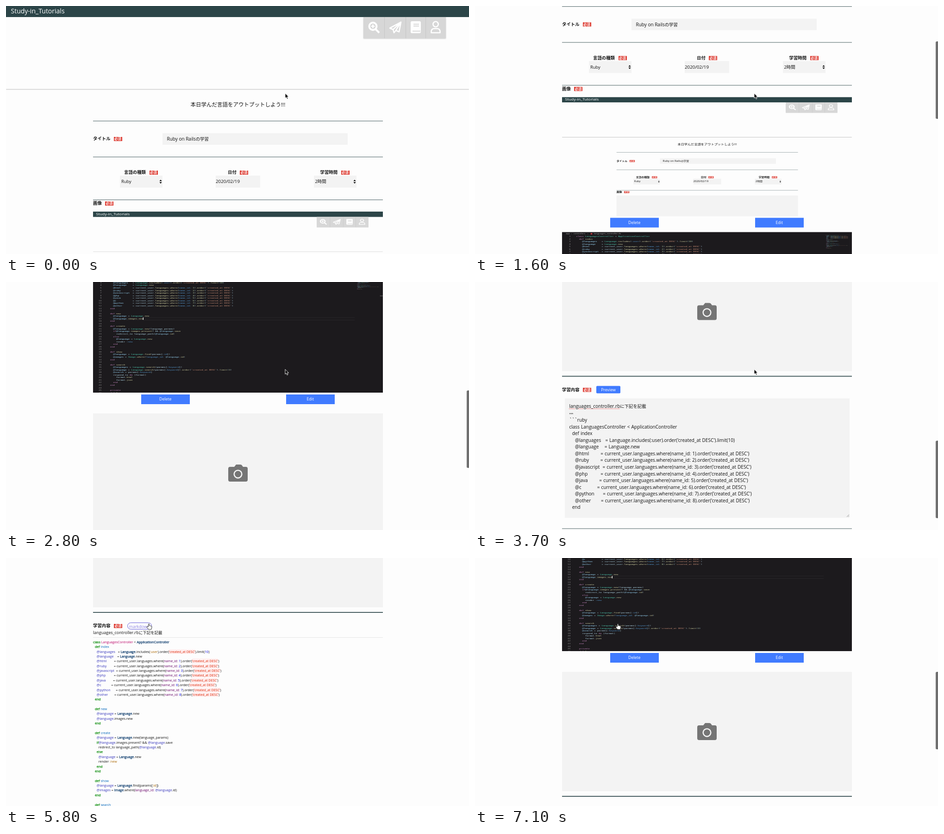
Recreate the animation shown at these times as an HTML page. Size 1000 by 538 pixels, loop 7.2 s.

```html
<!DOCTYPE html>
<html lang="ja">
<head>
<meta charset="utf-8">
<title>Study form</title>
<style>
html, body { margin: 0; width: 100%; height: 100%; overflow: hidden; background: #fdfdfd; }
body { position: relative; color: #111; font-family: "Open Sans", "Noto Sans CJK JP", sans-serif; }
div { position: absolute; white-space: pre; line-height: 20px; }
svg { position: absolute; overflow: visible; }
.jp { font-size: 94%; }
.badge { background: #dc352b; color: #fff; font-weight: 700; font-size: 7.5px; line-height: 9px; text-align: center; }
.btn { background: #407bff; color: #fff; font-size: 8.8px; text-align: center; }
.box { background: #f3f3f3; }
.scaled { transform: scale(.626, .4814); transform-origin: 0 0; overflow: hidden; }
.misspelt { text-decoration: underline dotted #e33 1.2px; text-underline-offset: 2px; }
.area { font-size: 10px; line-height: 14.53px; word-spacing: .5px; }
.area div { line-height: inherit; }
.light { font-size: 7.1px; line-height: 10.38px; word-spacing: .12px; }
.light .k { color: #080; } .light .t { color: #b06; } .light .c { color: #036; }
.light .f { color: #06b; } .light .i { color: #33b; } .light .y { color: #a60; }
.light .e { color: #606; } .light .n { color: #00d; }
.light .s { color: #d20; background: #fff0f0; }
.light :is(.k, .c) { -webkit-text-stroke: .25px; }
.dark { font: 8.6px/11.54px "DejaVu Sans Mono", monospace; color: #b5dcec; }
.dark .k { color: #c586c0; } .dark :is(.t, .c) { color: #4ec9b0; } .dark :is(.f, .m) { color: #dcdcaa; }
.dark .i { color: #9cdcfe; } .dark :is(.y, .e) { color: #569cd6; }
.dark .n { color: #b5cea8; } .dark .s { color: #ce9178; }
</style>
</head>
<body>
<script>
const fields = "html ruby javascript php java c python other".split(" ");
const assign = (name, value) => "    " + ("@" + name).padEnd(13) + "= " + value;
const ruby = [
  "class LanguagesController < ApplicationController",
  "  def index",
  assign("languages", "Language.includes(:user).order('created_at DESC').limit(10)"),
  assign("language", "Language.new"),
  ...fields.map((f, i) => assign(f, `current_user.languages.where(name_id: ${i + 1}).order('created_at DESC')`)),
  `  end

  def new
    @language = Language.new
    @language.images.new
  end

  def create
    @language = Language.new(language_params)
    if@language.images.present? && @language.save
      redirect_to language_path(@language.id)
    else
      @language = Language.new
      render :new
    end
  end

  def show
    @language = Language.find(params[:id])
    @images = Image.where(language_id: @language.id)
  end

  def search
    @languages = Language.search(params[:keyword])
    @language = Language.search(params[:keyword]).order('created_at DESC').limit(3)
    @search = params[:keyword]
    respond_to do |format|
      format.html
      format.json
    end
  end

  private
  def language_params`
].join("\n");

const escape = s => s.replace(/&/g, "&amp;").replace(/</g, "&lt;");
const token = /(?<s>'[^']*')|(?<i>@\w+)|(?<t>(?<=class )\w+)|(?<f>(?<=def )\w+)|\b(?<k>class|def|end|if|else|do|private)\b|(?<y>:\w+)|(?<e>\w+:)|\b(?<c>[A-Z]\w+)|\b(?<n>\d+)\b|(?<m>\.\w+)/g;
const colored = escape(ruby).replace(token, (word, ...rest) => {
  const groups = rest.at(-1);
  return `<span class="${Object.keys(groups).find(k => groups[k])}">${word}</span>`;
});

const box = (x, y, w, h, css = "", html = "", cls = "") =>
  `<div class="${cls}" style="left:${x}px;top:${y}px;width:${w}px;height:${h}px;${css}">${html}</div>`;
const text = (x, y, s, size = 10, css = "") =>
  `<div style="left:${x}px;top:${y - 10}px;font-size:${size}px;${css}">${s}</div>`;
const block = (x, y, cls, s, css = "") =>
  `<div class="${cls}" style="left:${x}px;top:${y}px;${css}">${s}</div>`;
const svg = (x, y, html) => `<svg width="1" height="1" style="left:${x}px;top:${y}px">${html}</svg>`;
const rule = (y, h = 1) => box(188, y, 626, h, "background:#4a6063");
const label = (x, y, s, badgeX) =>
  text(x, y, s, 9.4, "font-weight:700") + box(badgeX, y - 3.7, 18, 9, "", "必須", "badge");
const button = (x, y, s, w = 104.5, h = 21, css = "") =>
  box(x, y, w, h, `line-height:${h}px;${css}`, s, "btn");
const buttons = y => button(292, y, "Delete") + button(605, y, "Edit");
const select = (x, s) => box(x, 368, 92, 26, "", "", "box") + text(x + 3, 381, s, 9.4) +
  svg(x + 88, 381, `<path d="M-2.6-1 0-4.2 2.6-1zM-2.6 1 0 4.2 2.6 1z"/>`);

const icons = `<rect width="178" height="46" fill="#d7d7d7" style="filter:drop-shadow(0 1px 1px #ccc)"/>
<path d="M45.5 0v46M91.5 0v46M134.500 0v46" stroke="#c6c6c6"/>
<g fill="none" stroke="#fff" stroke-width="2.6" stroke-linejoin="round">
<g stroke-width="4"><circle cx="20.500" cy="20" r="8"/><path d="M26 26l8 8"/></g>
<path d="M20.500 16v8M16.500 20h8"/>
<path d="M81 11 57 24l7 3 2 7 4-5 7 3zM64 27 81 11 70 29"/>
<circle cx="156" cy="15.500" r="5.700"/><path d="M146.500 34v-3a6 6 0 0 1 6-6h7a6 6 0 0 1 6 6v3z"/></g>
<rect x="102" y="9" width="22" height="26" rx="3" fill="#fff"/>
<path d="M108 15.500h12M108 19.500h12M106 30.500h17" stroke="#d7d7d7" stroke-width="2"/>`;

const form = box(0, 0, 1000, 180, "background:#fdfdfd;box-shadow:0 1px 2px #bbb") +
  box(0, 0, 1000, 24, "background:#2c4548") +
  text(10.5, 10.5, "Study-in_Tutorials", 14, "color:#fff") + svg(772, 24, icons) +
  text(398.5, 213.5, "本日学んだ言語をアウトプットしよう!!!", 11.5) +
  rule(248.5) + label(188, 287.5, "タイトル", 232.5) +
  box(338, 275.5, 400, 25, "", "", "box") + text(347.5, 287.5, `Ruby on Rails<span class="jp">の学習</span>`) +
  rule(327) + label(255, 360.5, "言語の種類", 309.5) + select(246, "Ruby") +
  label(479, 360.5, "日付", 505) + box(453, 368, 95.5, 26, "", "", "box") + text(453, 381, "2020/02/19", 9.8) +
  label(678.5, 360.5, "学習時間", 723.5) + select(664.5, "2時間") +
  rule(419.5) + label(188, 427.5, "画像", 214);

const shot = box(188, 445.5, 1000, 538, "background:#fdfdfd",
  form + box(188, 444, 626, 94, "", "", "box"), "scaled");

const numbers = Array.from({ length: 46 }, (_, i) => String(i + 1).padStart(2)).join("\n");
const editor = box(188, 739, 1000, 538, "background:#1c1a1d",
  text(13, 7, "app", 8, "color:#aaa") + text(32, 7, "›", 8, "color:#aaa") +
  text(40, 7, "controllers", 8, "color:#aaa") + text(88, 7, "›", 8, "color:#aaa") +
  box(98, 4, 7, 7, "border-radius:50%;background:#cc3e44") +
  text(110, 7, "languages_controller.rb", 8.5, "color:#aaa") +
  box(58, 198.5, 845, 10, "border:solid #353338;border-width:1px 0") +
  block(19, 14, "dark", numbers, "color:#858585") + block(48.7, 14, "dark", colored) +
  box(172, 199, 1.5, 11, "background:#fff") +
  block(909, 14, "dark", colored, "transform:scale(.18,.113);transform-origin:0 0") +
  box(990, 101, 10, 2, "background:#777"), "scaled");

const camera = svg(480, 1154, `<path fill="#757575" d="M4 5h9l4-5h8q3 0 4 1l3 4h6q4 0 4 4v24q0 4-4 4H4q-4 0-4-4V9q0-4 4-4z"/>
<circle cx="21" cy="20.800" r="8.300" fill="none" stroke="#f3f3f3" stroke-width="2.600"/>`);

const note = `に下記を記載`;
const sample = `<span class="misspelt">languages_controller.rb</span><span class="jp">${note}</span>
<span style="font:7.500px 'Liberation Sans',sans-serif">***</span>
\`\`\`ruby
` + escape(ruby.split("\n").slice(0, 13).join("\n"));
const write = button(262, 1333.5, "Preview", 52, 16, "border-radius:2px") +
  box(194, 1360.5, 615, 259, "", "", "box") + block(203.5, 1370.2, "area", sample) +
  svg(803, 1613, `<path d="M0 5 5 0M3 5 5 3" stroke="#777" stroke-width=".8"/>`) + rule(1643);
const read = box(261.5, 1334.5, 51, 13,
    "border:1.5px solid #6a62dc;border-radius:8px;color:#8a80e4;font-size:9px;line-height:15px;text-align:center", "markdown") +
  text(188, 1356.8, `languages_controller.rb<span class="jp">${note}</span>`, 9) +
  box(188, 1366.5, 626, 1, "background:#e6e6e6") + block(188, 1371.8, "light", colored);

document.body.innerHTML = `<div id="page" style="left:0;top:0;width:1000px;height:1733px">` +
  form + shot + buttons(707.5) + editor + buttons(1001.5) +
  box(188, 1043, 626, 258.5, "", "", "box") + camera + rule(1312, 1.6) + label(188, 1341.5, "学習内容", 233) +
  `<div id="write">${write}</div><div id="read">${read}</div></div>` +
  `<div id="thumb" style="left:995px;top:0;width:5px;height:168px;background:#707070;border-radius:2.5px 0 0 2.5px"></div>
<svg id="arrow" width="1" height="1" style="left:0;top:0"><path d="M0 0v10.500l2.400-2.200 1.700 4 1.900-.8-1.700-3.900h3.200z" stroke="#fff" stroke-width=".9"/></svg>
<svg id="hand" width="1" height="1" style="left:0;top:0"><path d="M-1.500 6V1q0-1.200 1.100-1.200T.700 1v3q1.500-.8 2 .4 1.500-.7 2 .5 1.300-.3 1.300 1.200-.1 2.800-1.300 5.900H-1.200Q-3 9.500-4.600 7.200q-.5-1.600 1-1.500z" fill="#fff" stroke="#222" stroke-width=".9"/></svg>`;

const $ = id => document.getElementById(id);
const clamp = v => Math.max(0, Math.min(1, v));
const stops = [[0, 0], [780, 0], [1600, 248.5], [2300, 547], [2800, 758], [3700, 1108.5],
  [4300, 1195], [6420, 1195], [7100, 796], [7200, 740]];

function scrollAt(t) {
  const i = stops.findIndex(s => s[0] > t);
  const [t0, y0] = stops[i - 1], [t1, y1] = stops[i];
  let p = (t - t0) / (t1 - t0);
  if (t0 === 780 || t0 === 6420) p **= 1.25;
  if (t0 === 3700) p = 1 - (1 - p) ** 2;
  return y0 + (y1 - y0) * p;
}

function draw(now) {
  const t = Math.floor(now % 7200 / 100) * 100;
  const y = scrollAt(t);
  $("page").style.transform = `translateY(${-y}px)`;
  $("thumb").style.transform = `translateY(${y * .311 - .5}px)`;
  $("thumb").style.opacity = t < 800 ? 0 : t < 6400 ? clamp((5200 - t) / 300) : 1;

  const preview = t >= 5200 && t < 6100;
  $("read").hidden = !preview;
  $("write").hidden = preview;

  const m = clamp((t - 4200) / 600), p = m * m * (3 - 2 * m);
  const place = `translate(${603 - 294 * p}px,${189.5 - 46.5 * p}px)`;
  $("arrow").style.transform = $("hand").style.transform = place;
  $("arrow").style.display = m < 1 ? "" : "none";
  $("hand").style.display = m < 1 ? "none" : "";
}

const start = performance.now();
(function tick() {
  draw(performance.now() - start);
  requestAnimationFrame(tick);
})();
</script>
</body>
</html>
```
